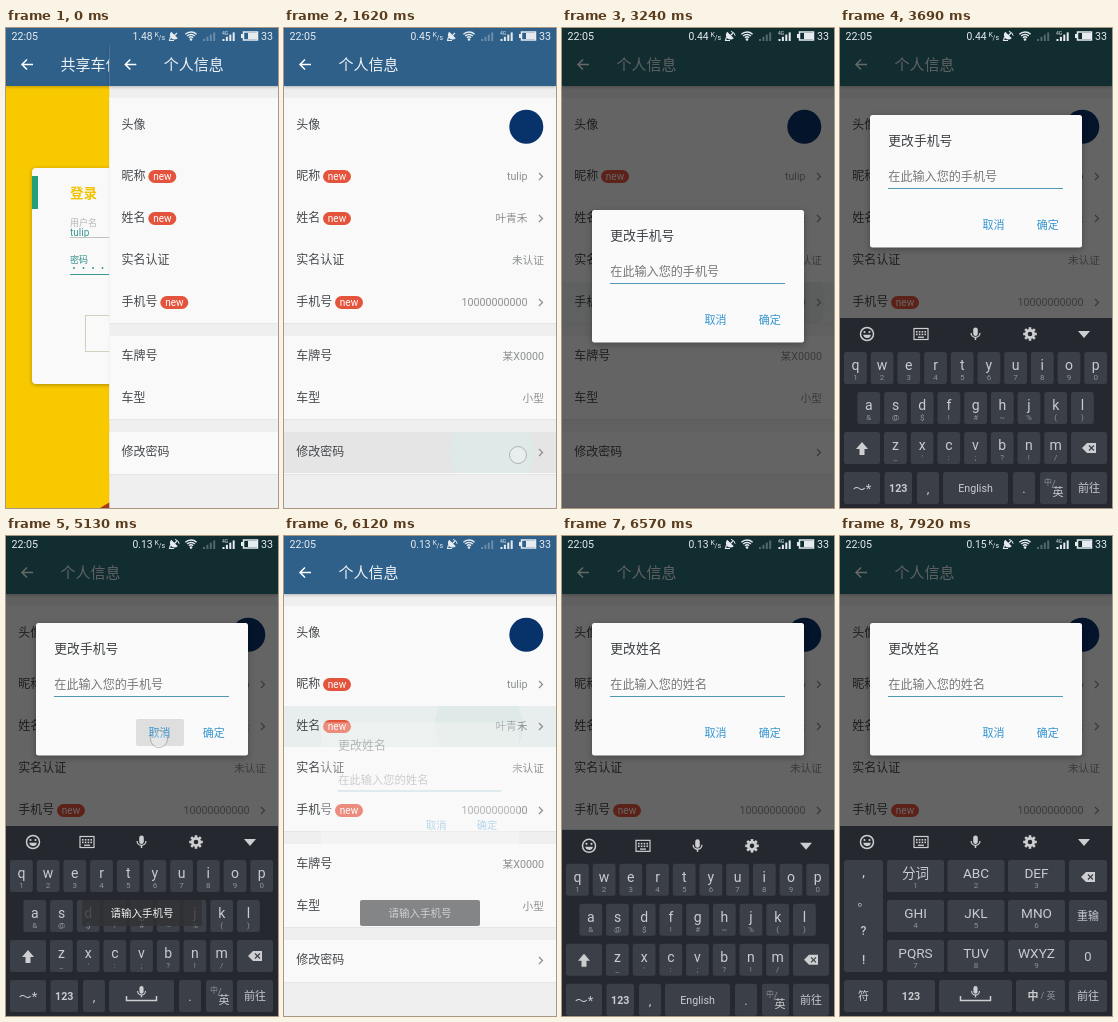
Write an HTML page with a canvas that moves like this. It is 272 by 480 pixels and loops after 8 s.

```html
<!DOCTYPE html>
<html lang="zh">
<head>
<meta charset="utf-8">
<style>
html, body { margin: 0; width: 100%; height: 100%; overflow: hidden; background: #efefef; }
canvas { display: block; width: 272px; height: 480px; }
</style>
</head>
<body>
<canvas id="stage"></canvas>
<script>
const W = 272, H = 480, LOOP = 8000;
const canvas = document.getElementById('stage');
const dpr = window.devicePixelRatio || 1;
canvas.width = W * dpr;
canvas.height = H * dpr;
const c = canvas.getContext('2d');

const FONT = 'Roboto, "Noto Sans CJK SC", "Noto Sans CJK", sans-serif';
const BLUE = '#2f608a', ICON = '#ccced0', KEY_INK = '#c9cbce';

const ramp = (t, a, b) => Math.min(1, Math.max(0, (t - a) / (b - a)));
const easeOut = p => 1 - (1 - p) ** 2;
const during = (t, a, b) => t >= a && t < b;

function text(s, x, y, size, color, align = 'left', weight = 400) {
  c.font = `${weight} ${size}px ${FONT}`;
  c.fillStyle = color;
  c.textAlign = align;
  c.fillText(s, x, y + size * 0.37);
}

function rect(x, y, w, h, color) {
  c.fillStyle = color;
  c.fillRect(x, y, w, h);
}

function box(x, y, w, h, r, color) {
  c.beginPath();
  c.roundRect(x, y, w, h, r);
  c.fillStyle = color;
  c.fill();
}

function frameRect(x, y, w, h, color, width = 1) {
  c.strokeStyle = color;
  c.lineWidth = width;
  c.strokeRect(x, y, w, h);
}

function disc(x, y, r, color, from = 0, to = 7) {
  c.beginPath();
  c.arc(x, y, r, from, to);
  c.fillStyle = color;
  c.fill();
}

// Each path is a flat list: x, y, x, y ...
function line(color, width, ...paths) {
  c.strokeStyle = color;
  c.lineWidth = width;
  c.beginPath();
  for (const p of paths)
    for (let i = 0; i < p.length; i += 2) c[i ? 'lineTo' : 'moveTo'](p[i], p[i + 1]);
  c.stroke();
}

function arc(x, y, r, from, to, color, width) {
  c.strokeStyle = color;
  c.lineWidth = width;
  c.beginPath();
  c.arc(x, y, r, from, to);
  c.stroke();
}

function shape(color, ...p) {
  c.beginPath();
  for (let i = 0; i < p.length; i += 2) c.lineTo(p[i], p[i + 1]);
  c.closePath();
  c.fillStyle = color;
  c.fill();
}

function shadow(blur, alpha, dy = 1) {
  c.shadowColor = `rgba(0,0,0,${alpha})`;
  c.shadowBlur = blur * dpr;
  c.shadowOffsetY = dy * dpr;
}

function layer(draw) {
  c.save();
  draw();
  c.restore();
}

// The bar turns teal as the page behind a dialog darkens
function toolbar(title, dim = 0) {
  layer(() => {
    shadow(3, 0.25);
    rect(0, 0, W, 58, BLUE);
  });
  rect(0, 0, W, 58, `rgba(43,112,118,${dim})`);
  line('#fff', 1.5, [27, 36.5, 16, 36.5], [21, 31.5, 16, 36.5, 21, 41.5]);
  text(title, 54.5, 36.5, 15, '#eef2f5');
}

function loginPage() {
  rect(0, 0, W, H, '#f9c900');
  shape('#a83a1c', 94, 480, 104, 474, 116, 480);
  layer(() => {
    shadow(4, 0.3);
    box(26, 140, 220, 216, 4, '#f9f9f9');
  });
  rect(26, 148, 6, 33, '#22a07c');
  text('登录', 64, 165, 13.5, '#f2c300', 'left', 700);
  text('用户名', 64, 195, 9, '#b5b5b5');
  text('tulip', 64, 204, 10, '#3a9a92');
  line('#c2c2c2', 1, [64, 209.5, 208, 209.5]);
  text('密码', 64, 232, 9, '#2d8f88');
  for (let i = 0; i < 5; i++) disc(68 + i * 9.5, 240, 0.9, '#2d8f88');
  line('#3a9a92', 1, [64, 246.5, 208, 246.5]);
  frameRect(79.5, 287.5, 113, 36, '#d3cfbd');
  toolbar('共享车位');
}

const ROWS = [
  { y: 97, label: '头像' },
  { y: 148, label: '昵称', isNew: true, value: 'tulip', arrow: true },
  { y: 190, label: '姓名', isNew: true, value: '叶青禾', arrow: true },
  { y: 232, label: '实名认证', value: '未认证' },
  { y: 274, label: '手机号', isNew: true, value: '10000000000', arrow: true },
  { y: 328, label: '车牌号', value: '某X0000' },
  { y: 370, label: '车型', value: '小型' },
  { y: 424, label: '修改密码', arrow: true }
];
const PRESSES = [
  { y: 424, x: 208, on: 1480, off: 1720, end: 2160 },
  { y: 274, x: 219, on: 2900, off: 3100, end: 3700 },
  { y: 190, x: 195, on: 5880, off: 6090, end: 6500 }
];

function profilePage(t, dim) {
  rect(0, 0, W, H, '#efefef');
  for (const [y, h] of [[70, 225], [308, 83], [404, 42]]) {
    layer(() => {
      shadow(1.5, 0.12, 0.5);
      rect(0, y, W, h, '#f9f9f9');
    });
  }
  for (const p of PRESSES) {
    if (!during(t, p.on, p.end)) continue;
    layer(() => {
      c.globalAlpha = 1 - ramp(t, p.off, p.end);
      c.beginPath();
      c.rect(0, p.y - 20, W, 41);
      c.clip();
      rect(0, p.y - 20, W, 41, p.y === 424 ? '#e5e5e5' : '#e7eeed');
      disc(p.x, p.y, 10 + 34 * easeOut(ramp(t, p.on, p.on + 180)), '#dfe9e7');
    });
  }
  for (const r of ROWS) {
    text(r.label, 12.2, r.y, 12, '#45494c');
    if (r.isNew) {
      const x = 15 + r.label.length * 12;
      box(x, r.y - 6, 28, 13, 6.5, '#e4543d');
      text('new', x + 14, r.y, 10, '#fff', 'center');
    }
    if (r.value) text(r.value, r.arrow ? 243.5 : 260, r.y, 10.7, '#8c8f91', 'right');
    if (r.arrow) line('#8c8c8c', 1.2, [255, r.y - 3, 258.5, r.y + 0.5, 255, r.y + 4]);
  }
  disc(242.3, 98.8, 17, '#07326a');
  toolbar('个人信息', dim);
}

function bars(x, color) {
  for (let i = 0; i < 4; i++) rect(x + i * 3.4, 11 - i * 2.2, 2, 2 + i * 2.2, color);
}

function statusBar(t) {
  const ink = '#e6ebef';
  const speed = t < 900 ? '1.48' : t < 1980 ? '0.45' : t < 3960 ? '0.44' : t < 7380 ? '0.13' : '0.15';
  text('22:05', 5.5, 8, 10.7, ink);
  text(speed, 126.5, 8, 10.3, ink);
  text('K', 148.5, 6, 7, ink);
  text('/s', 152.5, 9, 7, ink);
  disc(168.5, 7, 4.6, ink, Math.PI * 0.25, Math.PI * 1.25);
  line(ink, 1.1, [168, 8, 171, 5], [164.5, 9, 163.5, 12.5, 168, 12.5]);
  if (t >= 2610) arc(168, 8.5, 5.2, -1.4, -0.15, ink, 1);
  for (const r of [3, 5.5, 8]) arc(185, 12, r, -2.35, -0.8, ink, 1.4);
  disc(185, 11.5, 1.3, ink);
  bars(197, 'rgba(255,255,255,.28)');
  bars(216.5, ink);
  text('4G', 216, 5, 5, ink);
  frameRect(237.5, 4, 14, 8, ink, 1.5);
  rect(235, 6, 2, 4, ink);
  rect(242, 5, 9, 6, ink);
  text('33', 255, 8, 10.7, ink);
}

const DIALOGS = [
  { word: '手机号', open: 2970, typing: 3290, close: 5220 },
  { word: '姓名', open: 6060, typing: 6360, close: LOOP + 1000 }
];

const dimming = (d, t) =>
  ramp(t, d.open + 70, d.open + 250) * (1 - ramp(t, d.close, d.close + 180));

function dialog(d, t) {
  const shown = ramp(t, d.open, d.open + 180);
  const gone = ramp(t, d.close, d.close + 180);
  const alpha = shown * (1 - gone);
  const y = 182 - 95 * easeOut(ramp(t, d.typing, d.typing + 190));
  const scale = 0.85 + 0.15 * easeOut(shown) - 0.06 * gone;
  layer(() => {
    c.globalAlpha = alpha;
    c.translate(136, y + 66);
    c.scale(scale, scale);
    c.translate(-136, -66);
    layer(() => {
      shadow(6, 0.3 * alpha ** 4, 2);
      box(30, 0, 212, 132.5, 2.5, '#fafafa');
    });
    text('更改' + d.word, 48.3, 25, 12.8, '#3c4043');
    text(`在此输入您的${d.word}`, 48.3, 61.7, 12.1, '#777');
    line('#5299b5', 1, [48, 73.5, 223, 73.5]);
    if (during(t, 3880, 4140)) box(184, 96, 48, 27, 2, '#dedede');
    if (during(t, 4900, 5260)) box(130, 96, 48, 27, 2, '#dedede');
    text('取消', 153.5, 110, 11, '#3394d0', 'center');
    text('确定', 207.7, 110, 11, '#3394d0', 'center');
  });
}

function key(x, y, w, label, sub, h = 32, size = 13) {
  box(x, y, w, h, 2.5, '#3b3f47');
  text(label, x + w / 2, y + (sub ? 12.5 : 16), size, KEY_INK, 'center');
  if (sub) text(sub, x + w / 2, y + 25.5, 8, '#8f9398', 'center');
}

function backspace(x, y) {
  shape(ICON, x - 7, y, x - 2, y - 5, x + 7, y - 5, x + 7, y + 5, x - 2, y + 5);
  line('#3b3f47', 1.2, [x, y - 2.5, x + 5, y + 2.5], [x + 5, y - 2.5, x, y + 2.5]);
}

function mic(x, y, s) {
  box(x - 2.3 * s, y - 5.5 * s, 4.6 * s, 8.5 * s, 2.3 * s, ICON);
  arc(x, y, 4.4 * s, 0, Math.PI, ICON, 1.3 * s);
  line(ICON, 1.5 * s, [x, y + 4 * s, x, y + 7 * s]);
}

function tools() {
  const y = 306;
  arc(27, y, 6.5, 0, 7, ICON, 1.5);
  disc(24.5, y - 2, 1.1, ICON);
  disc(29.5, y - 2, 1.1, ICON);
  disc(27, y, 4, ICON, 0.2, 2.94);
  frameRect(74, y - 5.5, 14, 11, ICON, 1.2);
  for (let i = 0; i < 8; i++) rect(76 + i % 4 * 2.8, y - 3 + (i >> 2) * 2.6, 1.6, 1.6, ICON);
  rect(78, y + 2.6, 6, 1.3, ICON);
  mic(135.5, y - 1, 1);
  for (let i = 0; i < 8; i++) {
    const a = i * Math.PI / 4, u = Math.cos(a), v = Math.sin(a);
    line(ICON, 2.6, [190 + u * 4, y + v * 4, 190 + u * 6.8, y + v * 6.8]);
  }
  arc(190, y, 3.7, 0, 7, ICON, 2.8);
  shape(ICON, 238, y - 3, 250, y - 3, 244, y + 4);
}

const LAST_ROW = 444;

function space(x, w, label) {
  key(x, LAST_ROW, w, label, '', 32, 10.7);
  if (label) return;
  const m = x + w / 2;
  mic(m, 455, 0.9);
  line(ICON, 1.5, [m - 15, 460, m - 15, 464.5, m + 15, 464.5, m + 15, 460]);
}

function numbersKey(x, w) {
  key(x, LAST_ROW, w, '');
  text('123', x + w / 2, LAST_ROW + 16, 10.7, KEY_INK, 'center', 700);
}

function letters(label) {
  const rows = [
    ['qwertyuiop', '1234567890', 4, 324],
    ['asdfghjkl', '&@$!#~%()', 17.4, 364],
    ['zxcvbnm', "_':;?!/", 44, 404]
  ];
  for (const [keys, subs, x, y] of rows)
    [...keys].forEach((k, i) => key(x + i * 26.7, y, 22.8, k, subs[i], 32, 14));
  key(4, 404, 36, '');
  shape(ICON, 22, 414, 28, 421, 24.5, 421, 24.5, 427, 19.5, 427, 19.5, 421, 16, 421);
  key(231, 404, 36, '');
  backspace(249, 420);
  key(4, LAST_ROW, 36, '～*');
  numbersKey(44.5, 27.5);
  key(77, LAST_ROW, 22, ',');
  space(103, 65, label);
  key(173, LAST_ROW, 22, '.');
  key(200, LAST_ROW, 27, '');
  text('中', 208, 454, 8, '#8f9398', 'center');
  line('#8f9398', 0.8, [212, 460, 215, 452]);
  text('英', 218, 464, 11, KEY_INK, 'center');
  key(231, LAST_ROW, 36, '前往', '', 32, 11);
}

function ninePad() {
  key(4, 324, 39, '', '', 112);
  [...',。?!'].forEach((s, i) => text(s, 23.5, 337 + i * 29, 12, KEY_INK, 'center', 500));
  ['分词', 'ABC', 'DEF', 'GHI', 'JKL', 'MNO', 'PQRS', 'TUV', 'WXYZ'].forEach((k, i) =>
    key(47 + i % 3 * 60.5, 324 + Math.floor(i / 3) * 40, 57, k, String(i + 1), 32, 13.6));
  key(229, 324, 38, '');
  backspace(248, 341);
  key(229, 364, 38, '重输', '', 32, 11);
  key(229, 404, 38, '0');
  key(4, LAST_ROW, 39, '符', '', 32, 11);
  numbersKey(47, 48);
  space(99, 73, '');
  key(176, LAST_ROW, 49, '');
  text('中', 193, 460, 11, KEY_INK, 'center', 700);
  text('/ 英', 208, 460, 9, '#8f9398', 'center');
  key(229, LAST_ROW, 38, '前往', '', 32, 11);
}

function keyboard(d, t) {
  const up = easeOut(ramp(t, d.typing, d.typing + 246)) * (1 - ramp(t, d.close + 40, d.close + 230));
  if (!up) return;
  layer(() => {
    c.translate(0, 190 * (1 - up));
    rect(0, 290, W, 190, '#25282e');
    tools();
    if (t >= 7470) ninePad();
    else letters(t < d.typing + 1300 ? 'English' : '');
  });
}

function toast(t) {
  const alpha = ramp(t, 4230, 4500) * (1 - ramp(t, 6030, 6340));
  if (!alpha) return;
  layer(() => {
    c.globalAlpha = alpha;
    box(76, 364, 120, 26, 2, 'rgba(48,50,52,.82)');
    text('请输入手机号', 136, 377, 10.5, '#f2f2f2', 'center');
  });
}

// Finger position with the time it goes down and up
const TOUCHES = [
  [234, 427, 1440, 1710], [219, 266, 2790, 2970], [208, 198, 3870, 4110],
  [153, 203, 4860, 5220], [195, 187, 5850, 6030], [213, 461, 7290, 7450]
];

function touches(t) {
  for (const [x, y, down, up] of TOUCHES) {
    if (!during(t, down, up)) continue;
    disc(x, y, 8.5, 'rgba(255,255,255,.25)');
    arc(x, y, 8.5, 0, 7, 'rgba(135,135,135,.55)', 1);
  }
}

const start = performance.now();

function frame(now) {
  const t = Math.max(0, now - start) % LOOP;
  const active = DIALOGS.find(d => during(t, d.open, d.close + 240));
  const dim = active ? dimming(active, t) : 0;
  c.setTransform(dpr, 0, 0, dpr, 0, 0);
  const x = 104 * (1 - ramp(t, 0, 300)) ** 2;
  if (x > 0) loginPage();
  layer(() => {
    c.translate(x, 0);
    profilePage(t, dim);
  });
  if (x > 0) rect(0, 0, W, 17, BLUE);
  rect(0, 0, W, H, `rgba(0,0,0,${0.595 * dim})`);
  if (active) dialog(active, t);
  statusBar(t);
  if (active) keyboard(active, t);
  toast(t);
  touches(t);
  requestAnimationFrame(frame);
}
requestAnimationFrame(frame);
</script>
</body>
</html>
```
